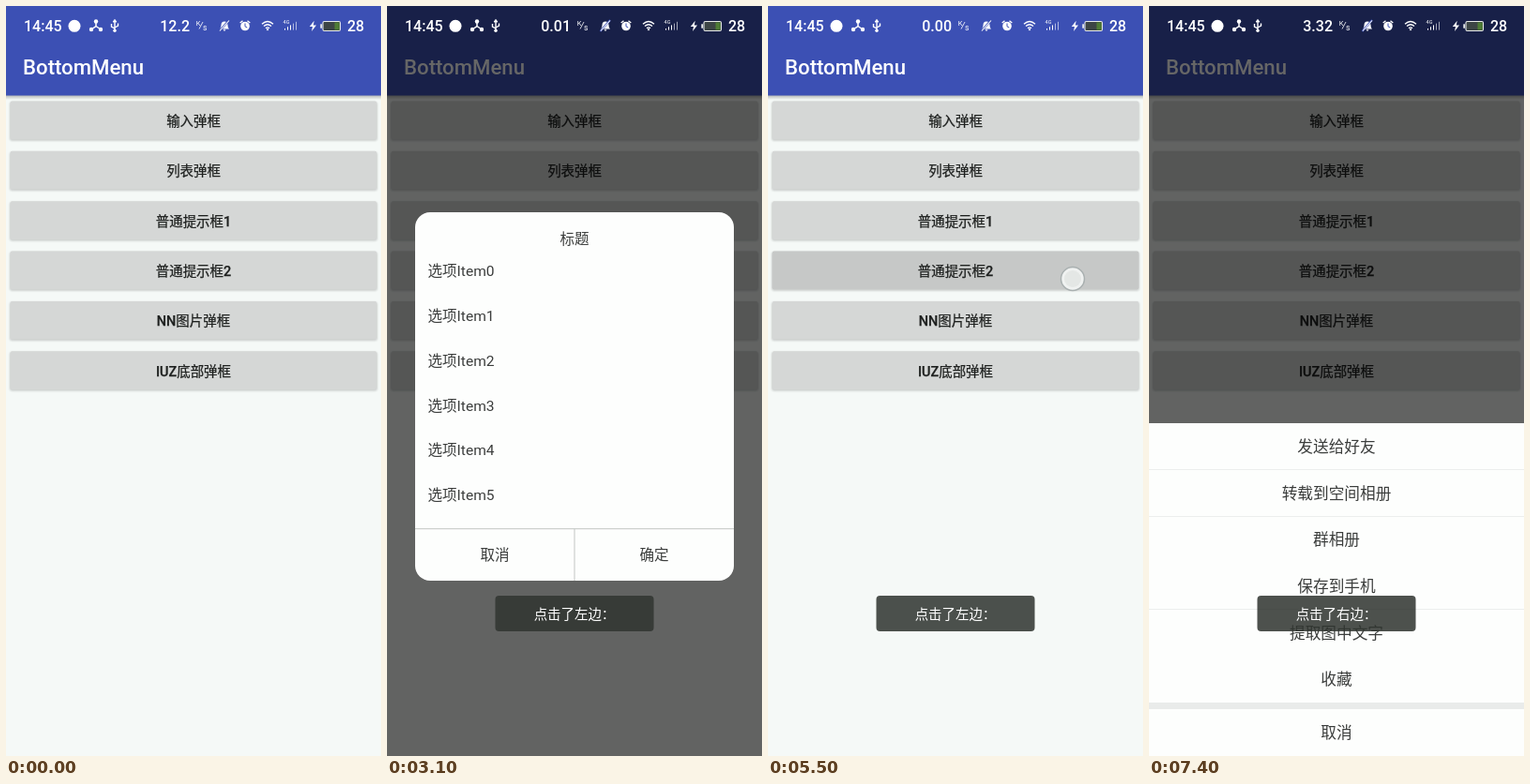
An HTML page for the animation above (7.5 s loop, 400 px wide and 800 px high).

```html
<!DOCTYPE html>
<html lang="zh-CN">
<head>
<meta charset="utf-8">
<title>BottomMenu</title>
<style>
html, body { margin: 0; width: 100%; height: 100%; overflow: hidden; background: #f5f9f7; }
svg { display: block; width: 100vw; height: 100vh; }
text { font-family: Roboto, "Noto Sans CJK SC", "Noto Sans CJK", sans-serif; white-space: pre; }
</style>
</head>
<body>
<svg id="stage" viewBox="0 0 400 800" xmlns="http://www.w3.org/2000/svg"></svg>
<script>
const LOOP = 7500, STEP = 100;
const stage = document.getElementById('stage');

// Markup helpers; text is placed by its vertical centre
const text = (x, y, s, size, fill, anchor = 'middle', extra = '') =>
  `<text x="${x}" y="${(y + size * 0.37).toFixed(2)}" font-size="${size}" fill="${fill}" text-anchor="${anchor}" ${extra}>${s}</text>`;
const rect = (x, y, w, h, fill, r = 0, extra = '') =>
  `<rect x="${x}" y="${y}" width="${w}" height="${h}" rx="${r}" fill="${fill}" ${extra}/>`;
const path = (d, stroke, width = 1, extra = '') =>
  `<path d="${d}" fill="none" stroke="${stroke}" stroke-width="${width}" ${extra}/>`;
const group = (id, body, extra = '') => `<g id="${id}" ${extra}>${body}</g>`;

const labels = ['输入弹框', '列表弹框', '普通提示框1', '普通提示框2', 'NN图片弹框', 'IUZ底部弹框'];
const INK = '#3b3d3c', PAPER = '#fdfefd', RULE = '#c2c5c3';

function mainScreen() {
  const buttons = labels.map((s, i) => {
    const y = 101.5 + i * 53.35;
    return rect(4, y + 0.8, 392, 41.4, '#000', 2.5, 'opacity=".18" filter="url(#soft)"') +
      rect(4.5, y, 391, 40.7, '#d5d7d6', 2, `id="btn${i}"`) +
      text(200, y + 21.2, s, 14.44, '#1e201f', 'middle', 'font-weight="500" stroke="#1e201f" stroke-width=".25"');
  }).join('');
  return rect(0, 0, 400, 800, '#f5f9f7') + rect(0, 95, 400, 5, 'url(#drop)') +
    rect(0, 0, 400, 95.5, '#3c50b4') +
    text(18, 65.2, 'BottomMenu', 22.2, '#fff', 'start', 'font-weight="500"') + buttons;
}

function statusBar() {
  const w = '#fff', bold = 'font-weight="500"';
  return text(19, 21, '14:45', 16, w, 'start', bold) +
    `<circle cx="73" cy="21.3" r="6.5" fill="#fff"/>` +
    path('M96 16V21.5L91 25M96 21.5L101 25', w, 1.5) +
    [[96, 16.5], [91, 25], [101, 25]].map(([x, y]) => `<circle cx="${x}" cy="${y}" r="2.2" fill="#fff"/>`).join('') +
    path('M116 15.5V27M112.5 19V22L116 24M119.5 18.5V21L116 23M114.3 17.2L116 15L117.7 17.2', w, 1.4) +
    `<circle cx="116" cy="26.3" r="1.7" fill="#fff"/>` +
    text(196, 21, '', 16, w, 'end', bold + ' id="speed"') +
    text(205, 18, 'K', 7.5, w) + path('M206 24.5L210 17', w, 0.8) + text(212.3, 23, 's', 8.5, w) +
    `<path d="M228 24.5Q229.5 23 229.5 20.5Q229.5 16.5 233 16.5Q236.5 16.5 236.5 20.5Q236.5 23 238 24.5ZM231.5 25.3H234.5L233 27Z" fill="#fff"/>` +
    path('M227.5 27L238 15', '#3c50b4', 2) + path('M228 26.5L238 15.5', w, 1.1) +
    `<circle cx="255" cy="21.5" r="4.8" fill="#fff"/>` +
    path('M249.7 18L252.5 15.8M260.3 18L257.5 15.8', w, 1.4) + path('M255 18.5V21.8L257.3 23', '#3c50b4', 1) +
    path('M273 19.3Q279 13.8 285 19.3M275 21.6Q279 18 283 21.6M277 23.8Q279 22 281 23.8', w, 1.3) +
    `<circle cx="279" cy="25.2" r="1.1" fill="#fff"/>` +
    group('arrow', path('M284.5 28V23.5M282.8 25.2L284.5 23.3L286.2 25.2', w, 1.2)) +
    text(299, 17, '4G', 5.5, w) +
    [0, 1, 2, 3, 4].map(i => rect(297 + i * 3, 24 - i * 1.8, 1, 1.6 + i * 1.8, w, 0, i > 2 ? 'opacity=".6"' : '')).join('') +
    '<path d="M328.7 15.8L323.8 22H327L326 27L331 20.5H327.8Z" fill="#fff"/>' +
    rect(338, 16.5, 18.5, 10, '#3c4545', 1.5, 'stroke="#e8ebe9" stroke-width="1.1"') +
    rect(350.5, 17.5, 5.2, 8, '#4e7c35') + rect(335.3, 19.3, 1.7, 4.4, '#e8ebe9') +
    text(364, 21, '28', 16, w, 'start', bold);
}

// Panel with title and two bottom choices
const panel = (x, y, h, body) => {
  const w = 400 - 2 * x, line = y + h - 55.3;
  return rect(x, y, w, h, PAPER, 16) + text(200, y + 28, '标题', 15.56, INK) + body +
    path(`M${x} ${line}H${x + w}M200 ${line}V${y + h}`, RULE, 1) +
    text(x + w / 4, line + 28, '取消', 15.56, INK) + text(x + w * 3 / 4, line + 28, '确定', 15.56, INK);
};
const inputPanel = () => panel(22, 171, 166,
  rect(39.5, 225.5, 321, 39.5, PAPER, 5, 'stroke="#8c908e"') + text(51, 245.5, '请输入样式', 15.56, '#7d807e', 'start'));
const listPanel = () => panel(30, 220, 393, '<g clip-path="url(#listClip)">' + group('items',
  Array.from({ length: 12 }, (_, i) => text(43.5, 282.5 + i * 47.8, '选项Item' + i, 15.56, INK, 'start')).join('')) + '</g>');
const hintPanel = () => panel(30, 346, 141, text(200, 407, '提示内容', 15.56, INK));

function sheet() {
  const rows = ['发送给好友', '转载到空间相册', '群相册', '保存到手机', '提取图中文字', '收藏'];
  return rect(0, 445, 400, 365, PAPER) +
    path('M0 494.5H400M0 544.5H400M0 643.5H400', '#eceeed', 1) +
    rows.map((s, i) => text(200, 470 + i * 49.65, s, 16.67, INK)).join('') +
    rect(0, 743, 400, 7, '#e9ebea') + text(200, 775.3, '取消', 16.67, INK);
}

function keyboard() {
  const face = '#f7fbf9', ink = '#7c807e';
  const lime = '#a8c432', teal = '#70dcd5', orange = '#e18d58', tan = '#c99b74';
  const key = (x, y, w, h, edge = '#d3d6d4') =>
    rect(x, y + 1, w, h, '#d9dcda', 5) + rect(x, y + 1, w, h - 0.5, edge, 5) +
    rect(x, y, w, h - 1.5, face, 4, 'stroke="#dde0de" stroke-width=".6"');
  const letters = ['1', 'ABC', 'DEF', 'GHI', 'JKL', 'MNO', 'PQRS', 'TUV', 'WXYZ'];
  const edges = [lime, teal, tan, teal, orange, lime, orange, teal, lime];
  const grid = letters.map((s, i) => {
    const x = 69 + i % 3 * 89, y = 528 + Math.floor(i / 3) * 64.4;
    return key(x, y, 84, 58, edges[i]) + text(x + 42, y + 31, s, 21.5, ink) +
      (i ? text(x + 42, y + 12.7, i + 1, 14, ink) : '');
  }).join('');
  const side = ['o', 'm', 'n', 'M'].map((s, i) =>
    key(6, 533 + i * 41.2, 57, 37.5) + text(34.5, 552 + i * 41.2, s, 15, ink)).join('');
  const words = [['你', 207], ['噢', 255], ['吗', 302], ['⊙', 86.5], ['∀', 111], ['⊙', 136], ['!', 154]]
    .map(([s, x]) => text(x, 499.5, s, 24, ink)).join('');
  return rect(0, 474, 400, 340, '#eceeed') +
    rect(6, 475, 388, 44.5, face, 4, 'stroke="#dfe2e0" stroke-width=".7"') +
    group('words', rect(0, 446, 27, 28, '#e6e9e7') + text(13, 462, 'o', 18, '#626664') +
      text(31.5, 499.5, '哦', 24, '#2e86b5') + words) +
    path('M337.5 481V517', '#9da19f') + path('M363.5 491L372.5 499.5L363.5 508', ink, 2) +
    side + grid +
    key(337, 528, 57, 58) + key(337, 592.4, 57, 58) + key(337, 656.8, 57, 58) +
    path('M352 559L359.5 549.5H377.5V568.5H359.5ZM363 554.5L372 563.5M372 554.5L363 563.5', ink, 2) +
    text(365.5, 623.5, '重输', 17.6, ink) + text(365.5, 687.5, '0', 22, ink) +
    key(6, 722, 57, 52) + text(34.5, 749, '符', 21.5, ink) +
    key(69, 722, 70, 52) + text(104, 749, '123', 20.5, ink) +
    key(144, 722, 112, 52, lime) + rect(196.5, 736, 7, 12, ink, 3.5) +
    path('M193.5 743Q193.5 751 200 751Q206.5 751 206.5 743M200 751V755', ink, 1.5) +
    path('M185.5 758V764.5H214.5V758', ink, 2.5) +
    key(261, 722, 69, 52) + text(288.5, 743, '中', 19, ink) + text(305, 760, '英', 14, ink) + path('M284 763L307 740', ink, 1.2) +
    key(337, 722, 57, 52) + path('M354 750H377V742.5', '#dd9c55', 2.8) + '<path d="M351 750L359 743.5V756.5Z" fill="#dd9c55"/>';
}

stage.innerHTML = `<defs>
  <linearGradient id="drop" x1="0" y1="0" x2="0" y2="1"><stop stop-color="#000" stop-opacity=".28"/><stop offset="1" stop-color="#000" stop-opacity="0"/></linearGradient>
  <filter id="soft" x="-5%" y="-20%" width="110%" height="150%"><feGaussianBlur stdDeviation="1.1"/></filter>
  <clipPath id="listClip"><rect x="30" y="265" width="340" height="292"/></clipPath></defs>` +
  group('main', mainScreen()) + rect(0, 0, 400, 800, '#000', 0, 'id="dim"') +
  group('status', statusBar()) +
  group('input', inputPanel()) + group('list', listPanel()) + group('hint', hintPanel()) + group('sheet', sheet()) +
  group('keys', keyboard()) +
  group('toast', rect(0, 629, 0, 38, '#303530', 4, 'id="toastBox" fill-opacity=".86"') + text(200, 648.3, '', 14.44, '#fff', 'middle', 'id="toastText"')) +
  group('touch', '<circle r="12.5" fill="#f3f5f4" fill-opacity=".92" stroke="#a9b0b0" stroke-width="1.5"/><circle r="9" fill="#e4e7e5"/>');

const el = id => document.getElementById(id);
const attr = (id, name, value) => el(id).setAttribute(name, value);
const show = (id, alpha) => { attr(id, 'opacity', alpha); attr(id, 'visibility', alpha > 0 ? 'visible' : 'hidden'); };
const ramp = (t, a, b) => Math.max(0, Math.min(1, (t - a) / (b - a)));
const ease = k => 1 - (1 - k) ** 2;
const shift = (id, y) => attr(id, 'transform', `translate(0 ${y})`);
const fade = (t, a, b) => Math.min(ramp(t, a, a + 150), 1 - ramp(t, b, b + 100));

// x, y, down, up, pressed button, drag distance
const touches = [
  [250, 125, 300, 500, 0], [295, 628, 1000, 1050], [110, 312, 2050, 2250],
  [300, 178, 2800, 2880, 1], [250, 520, 3200, 3350, null, -190], [150, 430, 3450, 3520],
  [320, 232, 4200, 4380, 2], [115, 460, 4800, 4900], [325, 291, 5400, 5550, 3],
  [285, 460, 6100, 6200], [310, 338, 6700, 6850, 4]
];
// text, box width, fade-in start and end, removal
const toasts = [
  ['点击了左边：', 169, 2400, 2600, 3600], ['选择了：选项Item6', 206, 3620, 3920, 5000],
  ['点击了左边：', 169, 5000, 5250, 6250], ['点击了右边：', 169, 6280, 6560, LOOP]
];
const speeds = [[0, '12.2'], [700, '0.03'], [2300, '0.01'], [4500, '0.00'], [6900, '3.32']];

function draw(t) {
  el('speed').textContent = speeds.filter(s => s[0] <= t).pop()[1];
  show('arrow', t >= 6400 && t < 6700 ? 1 : 0);

  const input = fade(t, 600, 2350), list = fade(t, 2900, 3550);
  const hint = Math.max(fade(t, 4500, 4950), fade(t, 5580, 6230));
  const rise = ease(ramp(t, 6900, 7200));
  show('input', input); show('list', list); show('hint', hint); show('sheet', rise ? 1 : 0);
  attr('dim', 'opacity', 0.6 * Math.max(input, list, hint, rise));
  shift('sheet', 355 * (1 - rise));
  shift('items', -130 * ease(ramp(t, 3150, 3400)));

  const open = ease(ramp(t, 850, 1000)) * (1 - ramp(t, 2450, 2600));
  show('keys', open ? 1 : 0);
  shift('keys', 354 * (1 - open));
  shift('input', 162.5 * (1 - ramp(t, 850, 1000)));
  show('words', t >= 1100 && open ? 1 : 0);

  const note = toasts.find(n => t >= n[2] && t < n[4]);
  show('toast', note ? ramp(t, note[2], note[3]) : 0);
  if (note) {
    el('toastText').textContent = note[0];
    attr('toastBox', 'x', 200 - note[1] / 2);
    attr('toastBox', 'width', note[1]);
  }

  const hit = touches.find(p => t >= p[2] && t < p[3] + 180);
  show('touch', hit ? 1 - ramp(t, hit[3], hit[3] + 180) : 0);
  if (hit) attr('touch', 'transform', `translate(${hit[0]} ${hit[1] + (hit[5] || 0) * ramp(t, hit[2], hit[3])})`);
  labels.forEach((_, i) => attr('btn' + i, 'fill', hit && hit[4] === i ? '#c6c8c7' : '#d5d7d6'));
}

const start = performance.now();
function tick() {
  const t = (performance.now() - start) % LOOP;
  draw(Math.floor(t / STEP) * STEP);
  requestAnimationFrame(tick);
}
draw(0);
requestAnimationFrame(tick);
</script>
</body>
</html>
```
